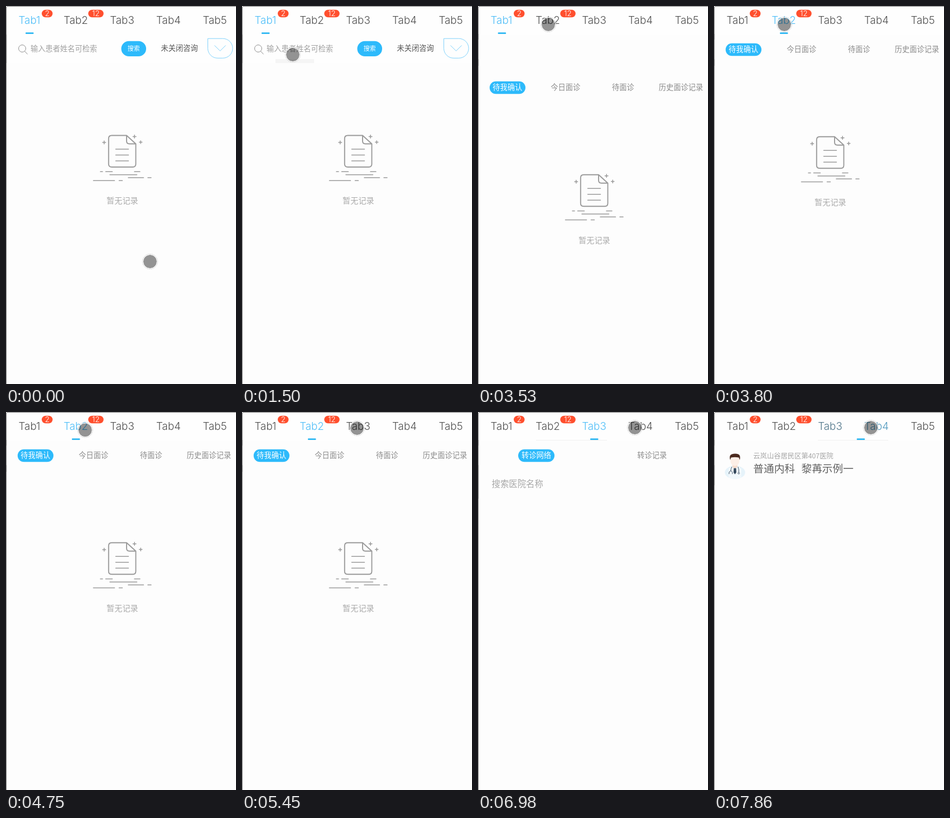
Animation of 412 by 676 pixels, one loop 8 s. Source, as an HTML page:

```html
<!DOCTYPE html>
<html lang="zh-CN">
<head>
<meta charset="utf-8">
<title>Tabs</title>
<style>
  html, body { margin: 0; width: 100%; height: 100%; overflow: hidden; background: #fdfdfd; }
  svg { display: block; width: 100vw; height: 100vh; }
  text { font-family: "Noto Sans CJK SC", "Noto Sans CJK", "Noto Sans", sans-serif; font-weight: 300; }
  .latin text { font-family: Inter, Roboto, sans-serif; }
  .mid { text-anchor: middle; }
  .line { fill: none; stroke: #9b9b9b; stroke-width: 1.5; stroke-linecap: round; stroke-linejoin: round; }
  .sheet { stroke-width: 1.9; }
  .edge { stroke: #ddd; }
</style>
</head>
<body>
<svg viewBox="0 0 412 676">
  <defs>
    <g id="empty">
      <path class="line sheet" d="M216 231.500H189.500Q183.800 231.500 183.800 237V282.500Q183.800 288 189.500 288H227Q232.500 288 232.500 282.500V246.500L216 231.500V241.500Q216 246.500 221 246.500H232.500"/>
      <path class="line" d="M196.500 256H219.500M196.500 266.500H219.500M196.500 277H219.500"/>
      <path class="line" d="M173 244h5.600M175.800 241.200v5.600M227.400 233.500h5.600M230.200 230.700v5.600M238.700 243.500h5.200M241.300 240.900v5.200"/>
      <path class="line" d="M169 296.300h4M178.500 296.300h12M230 296.300h10M186 301.700h48.500M219 307h27.500M254 307h6M156.500 312.300h38M202.500 312.300h6"/>
      <text class="mid" x="208.400" y="353.300" font-size="14.200" fill="#aaa">暂无记录</text>
    </g>
  </defs>

  <rect width="412" height="676" fill="#fdfdfd"/>
  <rect width="412" height="51" fill="#fefefe"/>

  <g class="pane">
    <rect x="1" y="51" width="411" height="51" fill="#fefefe"/>
    <rect id="trailA" x="60" y="95" width="69" height="7" fill="#f5f5f5"/>
    <path id="trailB" d="M94 50H140V58H82V53.500H94Z" fill="#f5f5f5"/>
    <g fill="none" stroke="#8f8f8f">
      <circle cx="29" cy="76" r="6.400"/>
      <path d="M33.500 80.800L38.500 86.300"/>
    </g>
    <text x="44" y="81" font-size="13.250" fill="#a0a0a0">输入患者姓名可检索</text>
    <rect x="206.500" y="62.700" width="44.500" height="27.300" rx="13.600" fill="#2dbafb"/>
    <text class="mid" x="228.800" y="80.200" font-size="11" fill="#fff">搜索</text>
    <text x="277.500" y="80.300" font-size="13.250" fill="#555">未关闭咨询</text>
    <g fill="none" stroke="#74cdfb" stroke-width=".9">
      <path d="M361.500 58.200H388.500A17.500 17.500 0 0 1 388.500 93.200H379A17.500 17.500 0 0 1 361.500 75.700Z"/>
      <path d="M373.500 70.500L383.500 80.300L393.500 70.500"/>
    </g>
    <use href="#empty"/>
    <path class="edge" d="M1.500 51V102"/>
  </g>

  <g class="pane">
    <g id="visit">
      <rect x="20.800" y="66.700" width="64.200" height="22.500" rx="11.250" fill="#2dbafb"/>
      <g class="mid" font-size="13.250" fill="#8a8a8a">
        <text x="52.800" y="82" fill="#fff">待我确认</text>
        <text x="156.700" y="82">今日面诊</text>
        <text x="260" y="82">待面诊</text>
        <text x="363.600" y="82">历史面诊记录</text>
      </g>
      <use href="#empty" y="2.300"/>
    </g>
    <path class="edge" d="M1.500 50V60M1.500 95V107"/>
  </g>

  <g class="pane">
    <path d="M104 50.500H231" stroke="#f0f0f0"/>
    <rect x="72" y="66.700" width="65" height="22.500" rx="11.250" fill="#2dbafb"/>
    <g class="mid" font-size="13.250">
      <text x="104.500" y="82" fill="#fff">转诊网络</text>
      <text x="311.700" y="82" fill="#8a8a8a">转诊记录</text>
    </g>
    <text x="24.500" y="134.200" font-size="15.400" fill="#a8a8a8">搜索医院名称</text>
    <path class="edge" d="M1.500 50V60M1.500 95V155"/>
  </g>

  <g class="pane">
    <path d="M186 50.500H312" stroke="#f0f0f0"/>
    <ellipse cx="37.600" cy="108" rx="18.200" ry="11.800" fill="#e6f3fa"/>
    <path d="M33 92H42V99L37.500 103L33 99Z" fill="#f6dccd"/>
    <path d="M32 97.500L37.500 102L43 97.500L49 101V117Q37.500 122 26 117V101Z" fill="#f1f8fc"/>
    <path d="M35.500 100.500H39.500L40 108L37.500 111.500L35 108Z" fill="#33475c"/>
    <ellipse cx="37.500" cy="87" rx="8" ry="9.500" fill="#fdefe7"/>
    <path d="M29 86Q26.500 77 32 75.500Q38 73.500 43.500 75.500Q48.500 78 46 86L44.500 81.500Q37.500 80 30.500 81.500Z" fill="#4b2a1e"/>
    <g fill="none" stroke="#4a5a6b">
      <path d="M32 98Q30 102 30 105M27 111V108Q30 102.500 33 108V111M43 98Q45 103 44.500 108"/>
      <circle cx="44.300" cy="109.500" r="1.400"/>
    </g>
    <text x="70.300" y="83.400" font-size="12.300" fill="#a5a5a5">云岚山谷居民区第407医院</text>
    <g font-size="18.700" fill="#606060">
      <text x="70.300" y="108">普通内科</text>
      <text x="156.500" y="108">黎苒示例一</text>
    </g>
    <path class="edge" d="M1.500 50V60M1.500 95V131"/>
  </g>

  <g id="tabs" class="mid latin" font-size="18.800"></g>
  <rect id="bar" y="47.300" width="14.500" height="2.600" rx="1" fill="#2fb8f3"/>
  <g class="mid latin" font-size="13.300" fill="#fff">
    <rect x="64" y="6.800" width="19.500" height="13.400" rx="6.700" fill="#ff4f2e"/>
    <text x="73.800" y="18.300">2</text>
    <rect x="147.300" y="6.800" width="27.500" height="13.400" rx="6.700" fill="#ff4f2e"/>
    <text x="161" y="18.300">12</text>
  </g>
  <path d="M412 .5H3Q.5 .5 .5 3V676" fill="none" stroke="#777"/>

  <g id="cursor">
    <circle r="12" fill-opacity=".42"/>
    <circle r="12.600" fill="none" stroke="#fff"/>
    <circle r="13.400" fill="none" stroke="#aaa" stroke-width=".6" stroke-dasharray="2 1"/>
  </g>
</svg>
<script>
const LOOP = 8000, TICK = 130, SLIDE = 300, LEAD = 38;
const $ = id => document.getElementById(id);

// Cursor stops: first and last visible step of the move, then where it ends.
const home = { x: 258, y: 457 };
const moves = [
  { start: 960, end: 1500, x: 91, y: 87 },
  { start: 2050, end: 2570, x: 126, y: 33 },
  { start: 4610, end: 5450, x: 206, y: 29 },
  { start: 6680, end: 6980, x: 281, y: 28 }
];
const switches = [-LOOP, 3410, 5880, 7730];
const idle = [80, 80, 80], lit = [78, 190, 248];

const tabX = i => 42 + 83 * i;
const lerp = (a, b, k) => a + (b - a) * k;
const smooth = p => p * p * (3 - 2 * p);
const cubic = p => p < .5 ? 4 * p ** 3 : 1 - 4 * (1 - p) ** 3;
const mix = k => `rgb(${idle.map((c, i) => Math.round(lerp(c, lit[i], k)))})`;
const show = (el, on) => el.setAttribute('display', on ? 'inline' : 'none');

const panes = [...document.querySelectorAll('.pane')];
const tabs = [1, 2, 3, 4, 5].map((n, i) => {
  const el = document.createElementNS('http://www.w3.org/2000/svg', 'text');
  el.textContent = 'Tab' + n;
  el.setAttribute('x', tabX(i));
  el.setAttribute('y', 31.8);
  return $('tabs').appendChild(el);
});

// Progress of a move in even, visible steps.
function stepped(t, { start, end }) {
  const gaps = Math.round((end - start) / TICK);
  const step = Math.floor((t - start) / (end - start) * gaps + 1e-6) + 1;
  return Math.max(0, Math.min(1, step / (gaps + 1)));
}

function cursorAt(t) {
  return moves.reduce((pos, move) => {
    const k = smooth(stepped(t, move));
    return { x: lerp(pos.x, move.x, k), y: lerp(pos.y, move.y, k) };
  }, home);
}

function draw(t) {
  const active = switches.findLastIndex(start => start <= t);
  const passed = Math.floor((t - switches[active]) / TICK) * TICK + LEAD;
  const k = cubic(Math.min(1, passed / SLIDE));

  panes.forEach((el, i) => show(el, i === active));
  tabs.forEach((el, i) =>
    el.setAttribute('fill', mix(i === active ? k : i === active - 1 ? 1 - k : 0)));
  $('bar').setAttribute('x', lerp(tabX(active - 1), tabX(active), k) - 7);
  $('visit').setAttribute('transform', `translate(0 ${k < 1 ? 68 : 0})`);

  show($('trailA'), t >= moves[0].end - TICK);
  show($('trailB'), t >= moves[1].end - TICK);
  const { x, y } = cursorAt(t);
  $('cursor').setAttribute('transform', `translate(${x} ${y})`);
}

const begin = performance.now();
function tick() {
  draw((performance.now() - begin) % LOOP);
  requestAnimationFrame(tick);
}
tick();
</script>
</body>
</html>
```
